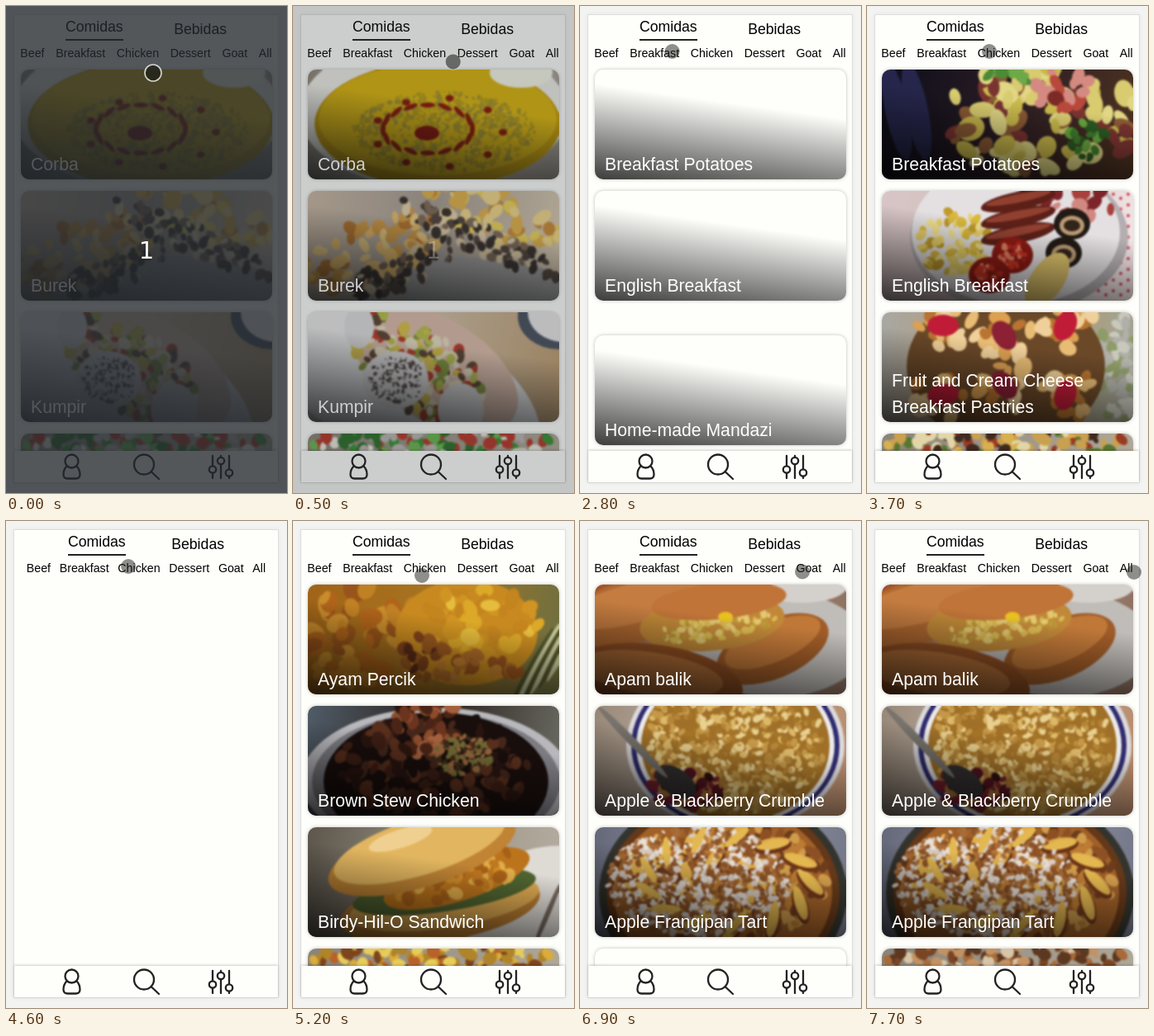
An HTML page with a canvas for the animation above (8000 ms loop, 340 by 590 pixels).

```html
<!DOCTYPE html>
<html lang="es">
<head>
<meta charset="utf-8">
<title>Comidas</title>
<style>
html, body { margin: 0; width: 100%; height: 100%; overflow: hidden; background: #f3f3f2; }
svg { position: absolute; left: 0; top: 0; }
#stage { position: relative; width: 340px; height: 590px; overflow: hidden;
  font-family: "Liberation Sans", Arial, sans-serif; white-space: nowrap; }
#page { position: absolute; left: 9px; top: 10px; width: 319px; height: 566px; background: #fefefb;
  border: 1px solid #dededc; box-shadow: 0 0 5px rgba(0,0,0,.06); }
#head { position: absolute; left: 169.5px; top: 15px; width: 318px; transform: translateX(-50%); }
#head div { display: flex; justify-content: space-evenly; align-items: flex-start; height: 34px; font-size: 17.7px; line-height: 20px; }
#head div + div { justify-content: space-around; font-size: 14.2px; line-height: 16px; }
.on { padding-bottom: 5px; border-bottom: 2px solid #222; }
.on + span { margin-top: 3px; }
#menus { position: absolute; left: 0; top: 0; width: 340px; height: 560px; overflow: hidden; }
.card { position: absolute; left: 18px; width: 304px; height: 133px; border-radius: 10px;
  background: #fefefb; box-shadow: 0 0 4px rgba(0,0,0,.25); }
.card canvas, .shade { position: absolute; inset: 0; border-radius: 10px; }
.shade { background: linear-gradient(8deg, rgba(0,0,0,.76), transparent 66%); }
.card p { position: absolute; left: 12px; bottom: 2px; margin: 0; font-size: 21.2px; line-height: 32px; color: #fff; }
#bar { position: absolute; left: 10px; top: 539px; width: 319px; height: 38px; background: #fefefb;
  box-shadow: 0 -1px 3px rgba(0,0,0,.2); }
.icon { fill: none; stroke: #222; stroke-width: 2.3; stroke-linecap: round; }
#veil { position: absolute; inset: 0; background: rgba(35,40,46,.78); }
</style>
</head>
<body>
<div id="stage">
  <div id="page"></div>
  <div id="menus"></div>
  <div id="head">
    <div><span class="on">Comidas</span><span>Bebidas</span></div>
    <div><span>Beef</span><span>Breakfast</span><span>Chicken</span><span>Dessert</span><span>Goat</span><span>All</span></div>
  </div>
  <div id="bar"></div>
  <svg width="340" height="590">
    <g class="icon">
      <circle cx="79.5" cy="551.5" r="8"/>
      <path d="M73.500 557.500q-4 4-4 10 0 5 5 5h10q5 0 5-5 0-6-4-10"/>
      <circle cx="167" cy="555.5" r="12"/><path d="M176 564.500l9 8.500"/>
      <path d="M250 545v12m0 9v6M260 545v1.500m0 9v16.500M270 545v16m0 9v2"/>
      <circle cx="250" cy="561.5" r="4.200"/><circle cx="260" cy="551" r="4.200"/><circle cx="270" cy="565.5" r="4.200"/>
    </g>
  </svg>
  <div id="veil"></div>
  <svg width="340" height="590">
    <text id="count" x="170" y="306" text-anchor="middle" fill="#fffff2" font-size="29"
      style="font-family:'DejaVu Sans',sans-serif">1</text>
    <g id="cursor"><circle r="9" fill="#1e1e1c" fill-opacity=".5"/>
      <circle id="ring" r="10" fill="#1e1e18" fill-opacity=".5" stroke="#d4d4ca" stroke-width="1.6"/></g>
  </svg>
</div>
<script>
const $ = id => document.getElementById(id);
let ctx, seed;
const rnd = () => (seed = seed * 16807 % 2147483647) / 2147483647;

// Backdrop from left to right
function back(...colors) {
  const g = ctx.createLinearGradient(0, 0, 304, 60);
  colors.forEach((c, i) => g.addColorStop(i / (colors.length - 1), c));
  ctx.fillStyle = g;
  ctx.fillRect(0, 0, 304, 133);
}
function spot(color, x, y, rx, ry = rx, tilt = 0) {
  ctx.fillStyle = color;
  ctx.beginPath();
  ctx.ellipse(x, y, rx, ry, tilt, 0, 7);
  ctx.fill();
}
// Heap of chunks that fills a tilted ellipse
function pile(colors, x, y, rx, ry, size, tilt = 0) {
  const list = colors.split(' ');
  for (let n = 3 * rx * ry / size ** 2; n > 0; n--) {
    const a = rnd() * 6.28, d = Math.sqrt(rnd()), u = rx * d * Math.cos(a), v = ry * d * Math.sin(a), s = size * (.5 + rnd() * .5);
    spot(list[rnd() * list.length | 0], x + u * Math.cos(tilt) - v * Math.sin(tilt),
      y + u * Math.sin(tilt) + v * Math.cos(tilt), s, s * (.5 + rnd() * .4), rnd() * 3);
  }
}
function around(n, x, y, rx, ry, put) {
  for (let i = 0; i < n; i++) {
    const a = i / n * 2 * Math.PI;
    put(x + rx * Math.cos(a), y + ry * Math.sin(a), a, i);
  }
}
const sliver = colors => () => { back('#8a8478', '#b0a898'); pile(colors, 152, 12, 150, 20, 9); };

const starters = [
  ['Corba', () => {
    back('#8f8578', '#d8d4cc', '#a39a90');
    spot('#eeece6', 152, 52, 162, 92);
    spot('#c59c08', 157, 66, 149, 76);
    spot('#d9b310', 157, 60, 144, 68);
    pile('#b89a18 #a3922c #d9b310', 165, 75, 110, 48, 4);
    around(16, 145, 72, 54, 29, (x, y, a) => spot('#8f1808', x, y, 9, 3, a + 1.6));
    around(9, 158, 76, 78, 42, (x, y) => spot('#8f1808', x, y, 5, 4));
    spot('#88130a', 144, 77, 15, 9);
    spot('#f6f5e6', 258, 4, 38, 18);
  }],
  ['Burek', () => {
    back('#cbb8a4', '#a79c92', '#d8c8b0');
    spot('#aaa6a4', 190, 125, 130, 45);
    pile('#d49a42 #e8bc68 #b8742c #eccb80', 78, 72, 88, 36, 13, -.35);
    pile('#53443a #3a302b #d8c4a0 #7a6452', 112, 98, 70, 20, 8, -.4);
    pile('#e0b04a #f0d58a #c98a38 #ead05c', 220, 26, 108, 30, 13, .35);
    pile('#53443a #3a302b #e4d0aa #806a56', 205, 58, 108, 18, 8, .42);
  }],
  ['Kumpir', () => {
    back('#c8c8d0', '#d2bfa4', '#bf9e74');
    spot('#4b5260', 304, 5, 50, 40); spot('#e8e6e4', 310, 0, 44, 36);
    spot('#eae8e8', 110, 85, 185, 88, .45);
    spot('#dcbcaa', 155, 70, 110, 62, .55);
    pile('#b9bf4c #d8c04c #84963c #b83a28 #e6dcc0 #5c4432', 130, 65, 92, 50, 9, .6);
    spot('#dfdddd', 62, 18, 18, 26); spot('#e2dfde', 106, 82, 40, 35); spot('#dedbda', 185, 118, 28, 32);
    pile('#5a4a48 #e2dfde', 108, 82, 34, 28, 3);
  }],
  ['Kumpir Salad', sliver('#3c8f34 #6bb552 #e9e6da #2f6f2b #b9b5b0 #b6392b')]
];
const breakfast = [
  ['Breakfast Potatoes', () => {
    back('#0c0e1a', '#2a1c24', '#4a3020');
    around(2, 30, 50, 12, 30, (x, y) => spot('#26264c', x, y, 14, 60, -.2));
    pile('#c9b84c #e0d684 #d8cb70 #8a5a34 #7a3430', 190, 62, 125, 65, 17);
    pile('#b8483c #d48a80 #7c2a26', 215, 26, 40, 24, 12);
    pile('#3f7c2d #68a83e #2b5a22', 248, 84, 22, 24, 9);
    pile('#4c8a36 #6fa848', 152, 8, 28, 12, 9);
  }],
  ['English Breakfast', () => {
    back('#d8c6c6', '#d0c0bc', '#f0e4e4');
    for (let i = 0; i < 60; i++) spot('#d04a60', 262 + i % 6 * 9, 4 + (i / 6 | 0) * 13 + i % 2 * 5, 2);
    spot('#b4aeb0', 166, 56, 132, 92); spot('#e4e0e2', 162, 50, 126, 88);
    pile('#d9b83c #e8d068 #c09a2c #f0e090', 88, 62, 42, 38, 9);
    pile('#a8403c #d08880 #7c2428', 235, 14, 48, 20, 12);
    for (let i = 0; i < 3; i++) { spot('#5c2018', 165, 12 + i * 20, 46, 11, -.2); spot('#914030', 165, 9 + i * 20, 40, 5, -.2); }
    for (let i = 0; i < 2; i++) {
      const x = 230 - i * 10, y = 40 + i * 35, tx = 158 - i * 28, ty = 78 + i * 24;
      spot('#221a14', x, y, 22, 19); spot('#b89a74', x, y + 2, 15, 12); spot('#33241a', x, y + 2, 10, 7);
      spot('#8f1b14', tx, ty, 25, 22); pile('#cc3424 #e08060 #b52a20', tx, ty, 17, 14, 5);
    }
    spot('#dfc46c', 200, 108, 20, 38, .6);
  }],
  ['Fruit and Cream Cheese<br>Breakfast Pastries', () => {
    back('#a8a8a4', '#b89868', '#a0a494');
    pile('#8d9c68 #c9c8bc #b0b0a8', 285, 70, 24, 70, 9);
    spot('#6a4828', 150, 66, 120, 95);
    for (let i = 0; i < 6; i++) {
      const x = 74 + i % 3 * 74, y = 16 + (i / 3 | 0) * 72 + i % 2 * 12;
      pile('#dca050 #f0d09a #b87430 #e8bc74', x, y, 36, 28, 14);
      spot(i % 3 === 1 ? '#8c2034' : '#c01c38', x, y, 19, 13, i);
    }
  }],
  ['Full Breakfast', sliver('#9a3a24 #d9b04f #58762f #e2d6a8 #3e2a20 #c9a050')]
];
const chicken = [
  ['Ayam Percik', () => {
    back('#a06418', '#a87420', '#707040');
    for (let i = 0; i < 6; i++) spot(i % 2 ? '#c4c498' : '#50542a', 268 + i * 10, 105 - i * 8, 4, 60, .5);
    pile('#b0641a #c08024 #98541a #c88c2c', 62, 62, 80, 62, 16);
    spot('#c88a20', 192, 58, 86, 64);
    pile('#dca828 #d09422 #c4841e #e6bc3c', 205, 48, 74, 42, 14);
    pile('#5c2c18 #84441c #9c5a20', 140, 86, 26, 28, 11);
    pile('#b06c28 #c4802c #98541e', 205, 102, 55, 18, 10);
  }],
  ['Brown Stew Chicken', () => {
    back('#505c68', '#2a201c', '#686860');
    spot('#b8b8bc', 155, 90, 163, 88); spot('#7c7c82', 155, 92, 150, 84);
    spot('#180e0c', 155, 92, 136, 84);
    pile('#3c1e14 #281410 #582e1c #180e0c #44261a', 155, 74, 118, 60, 12);
    pile('#6c341e #4a2416 #8c4c2c #2c160e #a4603c', 145, 26, 50, 36, 11);
    pile('#706834 #94663c #3c2a18', 188, 60, 34, 24, 5);
  }],
  ['Birdy-Hil-O Sandwich', () => {
    back('#5c564c', '#989080', '#b4aca0');
    spot('#dedad4', 270, 100, 110, 70, -.4);
    spot('#74685e', 290, 105, 3, 45, .4);
    spot('#b87c30', 160, 98, 122, 40, -.15); spot('#dca850', 165, 92, 116, 30, -.15);
    spot('#506430', 165, 78, 112, 24, -.15);
    spot('#bc741c', 180, 62, 92, 28, -.3);
    pile('#d08c28 #a86018 #e0ac48 #c07820', 185, 60, 78, 24, 10, -.3);
    spot('#c08434', 138, 32, 118, 40, -.3); spot('#e2b660', 135, 24, 108, 34, -.3);
    spot('#f0d090', 112, 14, 40, 11, -.3);
  }],
  ['Chicken Bake', sliver('#d9ac3c #b8622a #7d451c #e7cc5a #b08428')]
];
const dessert = [
  ['Apam balik', () => {
    back('#a05028', '#b89c88', '#8c7060');
    spot('#c0bcb8', 220, 72, 108, 64); spot('#d4d0cc', 250, 2, 55, 20);
    spot('#b06830', 55, 30, 105, 38, -.25); spot('#c47c40', 50, 22, 92, 24, -.25);
    spot('#a05c28', 215, 78, 72, 36, -.4); spot('#c07838', 215, 70, 62, 24, -.4);
    spot('#c08838', 142, 46, 88, 34, -.1);
    pile('#d8b850 #e2c870 #bc9438', 145, 52, 74, 15, 6, -.15);
    spot('#c07438', 150, 20, 82, 22, -.1); spot('#e8c020', 158, 39, 9, 6);
    spot('#945024', 75, 115, 105, 42, .15); spot('#b47038', 68, 108, 88, 26, .15);
  }],
  ['Apple & Blackberry Crumble', () => {
    back('#988878', '#c4b8ac', '#b88c6c');
    ['#dcdadc', '#302c70', '#eceae8', '#a07028'].forEach((c, i) => spot(c, 170, 48, 132 - i * 6, 104 - i * 4));
    pile('#c49848 #dcb868 #a47428 #e8d090 #b48438', 170, 45, 108, 86, 6);
    pile('#541420 #782030 #a87438 #30100f', 108, 100, 48, 26, 8);
    spot('#343030', 98, 92, 28, 16, .6); spot('#78736c', 46, 44, 60, 5, .8);
  }],
  ['Apple Frangipan Tart', () => {
    back('#646878', '#9498b0', '#747888');
    ['#34342e', '#643818', '#a06028'].forEach((c, i) => spot(c, 155, 80, 150 - i * 9, 124 - i * 8));
    pile('#bc7c34 #8c5024 #d09c4c #6c3c1c', 155, 65, 128, 72, 10);
    const slice = (x, y, a) => { spot('#6c3418', x, y + 3, 23, 9, a + .8); spot('#e0b04c', x, y, 21, 7, a + .8); };
    around(13, 155, 66, 106, 56, slice);
    around(7, 155, 66, 50, 28, slice);
    pile('#d8ccc4 #a86c38 #e8e0d8 #8c5428', 125, 65, 110, 66, 5);
    around(13, 160, 64, 98, 52, (x, y, a) => spot('#e4b850', x, y, 18, 5, a + .8));
  }],
  ['Almond Tart', sliver('#a86a38 #d8c4a6 #794524 #c49262 #5c3820')]
];
const draft = [['Breakfast Potatoes'], ['English Breakfast'], ['Home-made Mandazi']];

function makeCard([title, paint], i, box, top) {
  const card = document.createElement('div');
  card.className = 'card';
  card.style.top = top + 'px';
  card.innerHTML = `<canvas width="304" height="133"></canvas><div class="shade"></div><p>${title.replace('&', '&amp;')}</p>`;
  box.append(card);
  const photo = card.firstChild;
  if (paint) {
    ctx = photo.getContext('2d');
    seed = 4321 + i * 99;
    paint();
    ctx.filter = 'blur(1px)';
    ctx.drawImage(photo, 0, 0);
  }
  return photo;
}
const menus = [starters, breakfast, chicken, dessert, draft].map(list => {
  const box = document.createElement('div');
  $('menus').append(box);
  return { box, photos: list.map((c, i) => makeCard(c, i, box, 77 + 147 * i + (list === draft && i === 2 ? 28 : 0))) };
});

// Category taps: time, blank for, all photos after
const taps = [[-1000, 0, 1], [2600, 200, 700], [4600, 100, 300], [6400, 200, 600]];
// Cursor rests: from, until, x, y
const rests = [[0, 0, 178, 81], [700, 900, 200, 62], [1700, 1700, 105, 59], [1900, 1900, 149, 49], [2200, 2600, 91, 55],
  [3300, 3400, 163, 55], [3600, 3600, 140, 55], [3700, 5100, 148, 55], [5200, 5200, 156, 66], [5600, 5600, 313, 200],
  [6000, 6500, 226, 61], [7400, 8000, 323, 62]];

function cursorAt(t) {
  const i = rests.findLastIndex(r => r[0] <= t), [, end, x, y] = rests[i];
  if (t <= end) return [x, y];
  const [from, , p, q] = rests[i + 1], f = (t - end) / (from - end);
  return [x + (p - x) * f, y + (q - y) * f];
}
const start = performance.now();
function draw() {
  const t = Math.floor(Math.max(0, performance.now() - start) % 8000 / 100) * 100;
  const tap = taps.findLastIndex(k => k[0] <= t), [at, blank, full] = taps[tap];
  const since = t - at, empty = since < blank;
  const shown = tap === 1 && since < blank + 100 ? menus[4] : menus[tap];
  const loaded = 4 * (since - blank) / (full - blank);
  for (const m of menus) {
    m.box.style.display = m === shown && !empty ? '' : 'none';
    m.photos.forEach((p, i) => p.style.visibility = i + 1 <= loaded ? '' : 'hidden');
  }
  // The scrollbar's space is only free while cards overflow
  $('head').style.width = empty ? '300px' : '318px';
  $('cursor').setAttribute('transform', `translate(${cursorAt(t)})`);
  const fade = Math.max(0, 1 - t / 700);
  for (const id of ['veil', 'count', 'ring']) $(id).style.opacity = fade;
  requestAnimationFrame(draw);
}
draw();
</script>
</body>
</html>
```
